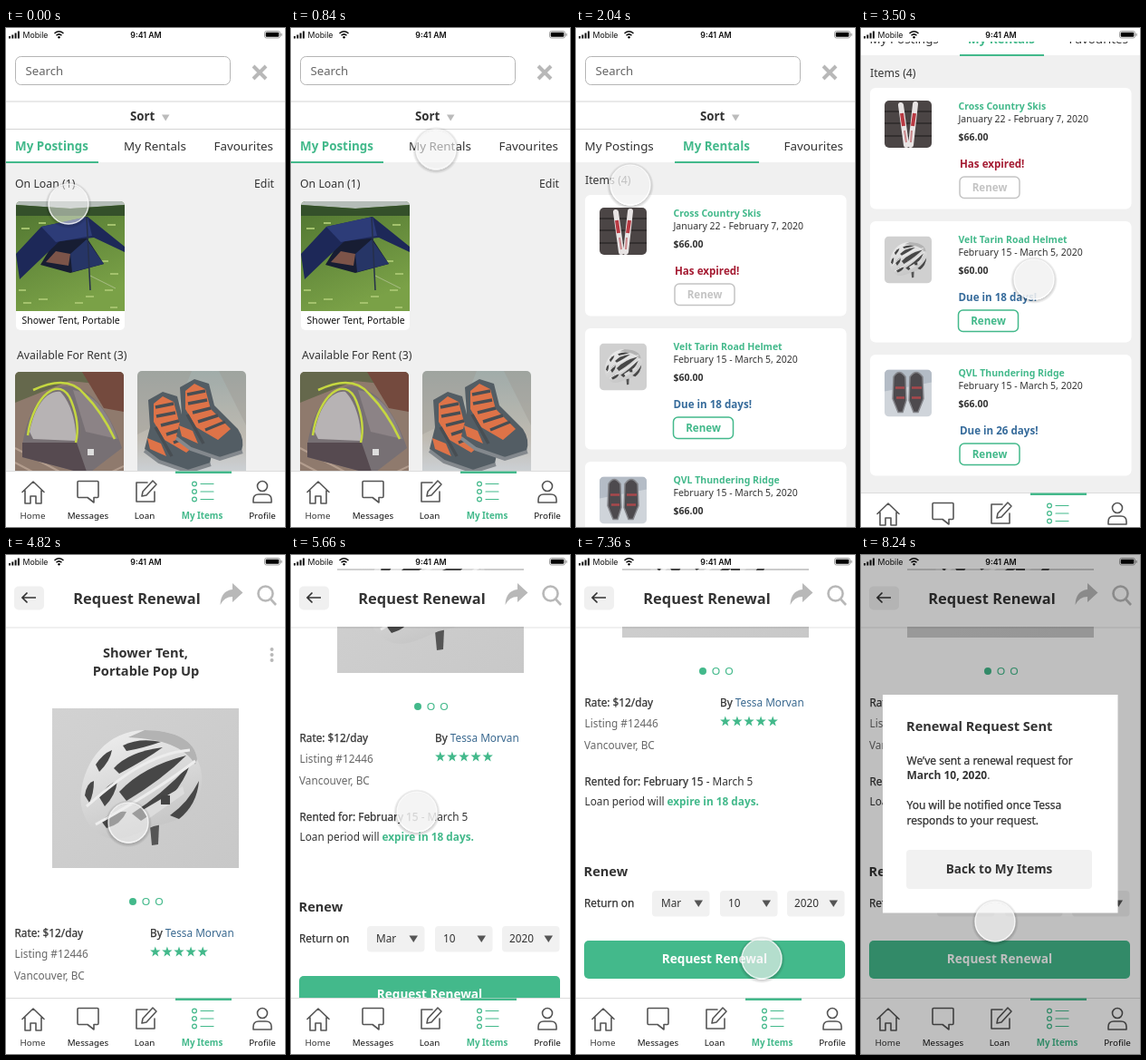
These frames come from a looping animation (308x550 px, 8.26 s). An HTML page:

```html
<!DOCTYPE html>
<html lang="en">
<head>
<meta charset="utf-8">
<title>Rental renewal flow</title>
<style>
html, body { margin: 0; width: 100%; height: 100%; overflow: hidden; background: #fff; }
svg { display: block; }
#stage { width: 308px; height: 550px; font: 11.8px "Noto Sans", "Open Sans", sans-serif; --green: #43b98b; }
text { fill: #333; white-space: pre; }
.m { stroke: #333; stroke-width: .25px; } .m tspan { stroke: none; } .b { font-weight: 600; }
.s10 { font-size: 10.5px; } .s12 { font-size: 12.3px; } .s13 { font-size: 13.4px; }
.s14 { font-size: 14.6px; } .s16 { font-size: 16.4px; } .st { font-size: 11.6px; }
.mid { text-anchor: middle; }
.g { fill: var(--green); } .soft { fill: #666; } .dark { fill: #111; }
.ln { fill: none; stroke: #555; stroke-width: 1.6; stroke-linejoin: round; stroke-linecap: round; }
.ln.on { stroke: var(--green); stroke-width: 1.2; }
.nav text { font-size: 9.8px; text-anchor: middle; }
.nav .g { font-weight: 600; }
.bar text { font: 600 8.8px Inter, sans-serif; fill: #111; }

.old, .in, .out, .fresh, .ski, .boots, .line, .dock, .list, .detail, .body, .modal, .cursor, .dot {
  animation: 8260ms ease-out infinite both;
}
.list { animation-name: scroll1; animation-timing-function: ease-in-out; }
.body { animation-name: scroll2; }
.old { animation-name: leave; }
.out { animation-name: fadeOut; }
.in { animation-name: fadeIn; }
.fresh { animation-name: slide; }
.ski { animation-name: late; }
.boots { animation-name: drift; }
.line { animation-name: tab; }
.dock { animation-name: dock; }
.detail { animation-name: open; }
.modal { animation-name: pop; }
.cursor { animation-name: move; animation-timing-function: ease-in-out; }
.dot { animation-name: press; animation-timing-function: linear; }

@keyframes fadeOut { 0%, 17.46% { opacity: 1 } 21.09%, 100% { opacity: 0 } }
@keyframes fadeIn { 0%, 17.46% { opacity: 0 } 21.09%, 100% { opacity: 1 } }
@keyframes leave { 0%, 18.2% { opacity: 1 } 21.09%, 100% { opacity: 0 } }
@keyframes late { 0%, 18.2% { opacity: 0 } 21.09%, 100% { opacity: 1 } }
@keyframes slide { 0%, 17.46% { transform: translateX(308px) } 21.09%, 100% { transform: none } }
@keyframes drift {
  0%, 17.46% { transform: none; opacity: 1 }
  21.09%, 100% { transform: translate(-120px, -180px); opacity: 0 }
}
@keyframes tab {
  0%, 17.46% { transform: none }
  21.09%, 100% { transform: translateX(109px) scaleX(.912) }
}
@keyframes dock { 0%, 17.46% { transform: none } 21.09%, 100% { transform: translateY(142px) } }
@keyframes scroll1 { 0%, 30.75% { transform: none } 40.19%, 100% { transform: translateY(-118px) } }
@keyframes open { 0%, 47.2% { opacity: 0 } 50.85%, 100% { opacity: 1 } }
@keyframes scroll2 { 0%, 61.5% { transform: none } 72%, 100% { transform: translateY(-254px) } }
@keyframes pop { 0%, 92.25% { opacity: 0 } 95.88%, 100% { opacity: 1 } }
@keyframes move {
  0% { transform: translate(69px, 194px) }
  11%, 18% { transform: translate(161px, 133px) }
  24.7% { transform: translate(60px, 173px) }
  30.5% { transform: translate(191px, 395px) }
  40.19%, 42.4% { transform: translate(191px, 277px) }
  46%, 50.5% { transform: translate(141px, 322px) }
  58.35% { transform: translate(135px, 295px) }
  61.5% { transform: translate(139px, 420px) }
  69%, 79.2% { transform: translate(139px, 282px) }
  89.1%, 98.3% { transform: translate(205px, 445px); animation-timing-function: ease-in }
  99.27% { transform: translate(183px, 424px); animation-timing-function: linear }
  99.76%, 100% { transform: translate(148px, 404px) }
}
@keyframes press {
  0%, 8% { fill-opacity: .5 } 16%, 21% { fill-opacity: .85 } 24.7% { fill-opacity: .75 }
  30%, 46% { fill-opacity: .87 } 51%, 59% { fill-opacity: .5 } 62%, 79% { fill-opacity: .85 }
  89%, 100% { fill-opacity: .65 }
}
</style>
</head>
<body>
<svg id="stage" viewBox="0 0 308 550">
  <defs>
    <clipPath id="round"><rect width="52" height="52" rx="5"/></clipPath>
    <clipPath id="top"><rect width="120" height="130" rx="5"/></clipPath>
    <linearGradient id="wall" x2="1" y2="1"><stop stop-color="#d2d2d2"/><stop offset="1" stop-color="#c8c8c8"/></linearGradient>
    <linearGradient id="lawn" x2=".4" y2="1"><stop stop-color="#4f7430"/><stop offset="1" stop-color="#7aa147"/></linearGradient>
    <linearGradient id="stone" x2="0" y2="1"><stop stop-color="#93a09d"/><stop offset=".6" stop-color="#b5b0a6"/><stop offset="1" stop-color="#c9d0d8"/></linearGradient>
    <linearGradient id="shell" x2=".4" y2="1"><stop stop-color="#f1f1f1"/><stop offset="1" stop-color="#c6c6c6"/></linearGradient>
    <radialGradient id="halo"><stop offset=".83" stop-opacity="0"/><stop offset=".85" stop-opacity=".2"/><stop offset="1" stop-opacity="0"/></radialGradient>
    <path id="star" d="M0-6L1.4-1.9H5.7L2.3.7L3.5 4.9L0 2.4L-3.5 4.9L-2.3.7L-5.7-1.9H-1.4Z"/>

    <g id="helmet">
      <path d="M108 130L110 151L117 150L118 128Z" fill="#555"/>
      <path d="M32 92C36 58 60 25 102 24C136 24 158 36 160 56C168 72 166 88 160 102C150 122 130 126 112 130C92 138 74 150 54 140C38 130 29 110 32 92Z" fill="url(#shell)"/>
      <path d="M102 24C136 24 158 36 160 56L158 62C146 42 122 34 84 32Z" fill="#b3b3b3"/>
      <g fill="#474747">
        <path d="M78 41Q96 32 120 37Q100 44 82 47Z"/>
        <path d="M68 66Q84 48 122 43Q104 56 74 72Z"/>
        <path d="M48 62Q56 50 66 46Q64 58 52 70Z"/>
        <path d="M74 92Q100 64 148 52Q122 78 82 102Z"/>
        <path d="M36 96Q38 82 46 80Q46 94 41 104Z"/>
        <path d="M52 98Q62 82 72 80Q70 96 58 108Z"/>
        <path d="M88 116Q120 96 152 62Q140 98 98 124Z"/>
        <path d="M54 124Q68 112 82 114Q76 128 60 132Z"/>
        <path d="M130 118Q150 104 162 80Q160 106 140 122Z"/>
      </g>
      <path d="M38 108C66 84 104 50 152 46M48 128C84 108 124 84 158 58" fill="none" stroke="#ededed" stroke-width="3"/>
      <path d="M100 112L144 86L146 94L106 122Z" fill="#dcdcdc"/>
      <rect x="120" y="96" width="10" height="10" fill="#444"/>
    </g>

    <g id="tarp">
      <path fill="url(#lawn)" d="M0 0H120V121H0Z"/>
      <path fill="#b5bdb8" d="M0 0H120V4L60 8L0 4Z"/>
      <path fill="#34502a" d="M0 4L60 8L120 4V16H0Z"/>
      <path d="M3 98h8m14 10h10m30 4h9m24-14h9M8 112h9m60-7h9m18 12h8M92 66h10m2 14h9M6 30h9m10-6h8m68 2h9" stroke="#a3c26c" stroke-width="2"/>
      <path fill="#171d33" d="M27 70L44 42L78 40L97 69L60 79Z"/>
      <path fill="#7c5449" d="M33 67L44 55L60 58L58 71Z"/>
      <path fill="#263566" d="M60 58L78 42L97 69L62 78Z"/>
      <path fill="#1d2858" d="M0 58L28 28L79 17L120 50V56L86 40L48 44L4 86Z"/>
      <path fill="#2d3c78" d="M28 28L79 17L84 38L44 45Z"/>
      <path d="M78 17L82 98" stroke="#26304a" stroke-width="1.5"/>
      <path d="M82 82L110 96" stroke="#bcc9a0" stroke-width=".7"/>
    </g>

    <g id="dome">
      <path fill="#8f7a6d" d="M0 0H120V121H0Z"/>
      <path fill="#65684c" d="M0 0H120V16L60 10L0 34Z"/>
      <path fill="#744a3e" d="M74 0H120V44L98 40Z"/>
      <path d="M0 100L40 121M0 84L70 121M84 121L120 104" stroke="#b39d8e" stroke-width="2"/>
      <path fill="#777074" d="M8 80C16 34 36 14 60 16C88 20 106 48 118 84L80 113L8 94Z"/>
      <path fill="#b7b3b4" d="M16 66C22 36 36 20 50 22C62 34 68 58 67 76L20 74Z"/>
      <path fill="#564a50" d="M8 78L68 78L80 113L8 94Z"/>
      <path fill="#8c8386" d="M64 20C88 24 104 46 113 74L78 66Z"/>
      <path d="M14 70C20 26 50 2 62 32C70 52 70 66 67 78M20 20Q58 2 76 24Q96 44 110 74" fill="none" stroke="#c5d740" stroke-width="2.5"/>
      <rect x="80" y="85" width="7" height="7" fill="#ddd"/>
    </g>

    <g id="boot">
      <path fill="#3b464e" d="M4 10L20 1L36 6L42 30L68 56Q76 68 72 80L48 88L14 76L0 64L6 40Z"/>
      <path fill="#d9602f" d="M10 14L20 6L32 12L38 34L60 56L46 68L22 54L10 34Z"/>
      <path fill="#d9602f" d="M3 52L18 58L24 72L6 64Z"/>
      <path d="M12 18L32 14M13 28L34 24M18 38L38 33M24 48L46 41M32 57L54 48M12 40L30 72" stroke="#2f363b" stroke-width="3.5"/>
      <path d="M0 66L16 78L48 89L73 81" fill="none" stroke="#72787d" stroke-width="4"/>
    </g>
    <g id="pair">
      <path fill="url(#stone)" d="M0 0H120V120H0Z"/>
      <path fill="#8f8b83" opacity=".4" d="M0 0H60L40 50L0 70ZM90 0H120V60Z"/>
      <use href="#boot" x="8" y="22"/>
      <use href="#boot" x="43" y="8"/>
      <path fill="#fff" opacity=".12" d="M0 0H120V120H0Z"/>
    </g>

    <g id="skis" clip-path="url(#round)">
      <path fill="#4b4545" d="M0 0H52V52H0Z"/>
      <path d="M0 12H52M0 25H52M0 39H52" stroke="#2d2929" stroke-width="1.5"/>
      <path d="M18 5L24 49M34 4L29 49" stroke="#e8e4e4" stroke-width="6" stroke-linecap="round"/>
      <path d="M19 14L21 28M33 14L31 28" stroke="#b93a43" stroke-width="4"/>
      <path d="M22 33L24 46M30 33L29 46" stroke="#c9868a" stroke-width="2"/>
    </g>
    <g id="snowshoes" clip-path="url(#round)">
      <path fill="#cfd4da" d="M0 0H52V52H0Z"/>
      <path fill="#b4bcc6" d="M0 0H52V14L0 24Z"/>
      <g fill="#4d4a4e" stroke="#85868b" stroke-width="1.5">
        <path d="M10 8Q16-2 23 8L24 34L20 47H15L9 32Z"/>
        <path d="M28 8Q35-2 42 8L43 32L37 47H32L27 34Z"/>
      </g>
      <path d="M12 20H22M30 20H41M13 31H22M30 31H40" stroke="#a8484c" stroke-width="2.5"/>
    </g>
    <g id="lid" clip-path="url(#round)">
      <path fill="#d0d0d0" d="M0 0H52V52H0Z"/>
      <use href="#helmet" transform="translate(-4 -1) scale(.31)"/>
    </g>

    <g id="nav" class="nav">
      <path fill="#fff" d="M0 488H308V550H0Z"/>
      <path d="M0 488.5H308" stroke="#dcdcdc"/>
      <path class="g" d="M187 488.5H249V491H187Z"/>
      <path class="ln" d="M18 511.5L30 500L42 511.5M21 509.5V524H27V516H33V524H39V509.5"/>
      <path class="ln" d="M80 499.500H101Q102 499.500 102 500.500V516Q102 517.500 101 517.500H97V523L90 517.500H80Q79 517.500 79 516V500.500Q79 499.500 80 499.500Z"/>
      <path class="ln" d="M156 501H144V522H164V511M150 516L151 511L162 499L166 503L155 515Z"/>
      <path class="ln on" d="M215 502.500H229M215 511H229M215 519.500H229"/>
      <g class="ln on"><circle cx="208" cy="502.500" r="2.400"/><circle cx="208" cy="511" r="2.400"/><circle cx="208" cy="519.500" r="2.400"/></g>
      <circle class="ln" cx="283" cy="505" r="5.500"/>
      <path class="ln" d="M273 523V520Q273 514 279 514H287Q293 514 293 520V523Z"/>
      <text x="29.500" y="541">Home</text><text class="dark" x="90.500" y="541">Messages</text><text class="dark" x="153" y="541">Loan</text>
      <text class="g" x="216.500" y="541">My Items</text><text class="dark" x="283" y="541">Profile</text>
    </g>
  </defs>

  <path fill="#fff" d="M0 0H308V550H0Z"/>
  <g class="list">
    <path fill="#f0f0f0" d="M0 148H308V700H0Z"/>
    <g class="old">
      <text class="s12" x="10" y="176">On Loan (1)</text><text class="s12" x="274" y="176">Edit</text>
      <rect x="11" y="191" width="120" height="142" rx="5" fill="#fff"/>
      <g transform="translate(11 191)" clip-path="url(#top)"><use href="#tarp"/></g>
      <text class="s10 dark" x="17.500" y="325.500">Shower Tent, Portable</text>
      <text class="s12" x="12" y="364.500">Available For Rent (3)</text>
      <rect x="10" y="379" width="120" height="142" rx="5" fill="#fff"/>
      <g transform="translate(10 379)" clip-path="url(#top)"><use href="#dome"/></g>
      <text class="s10 dark" x="16.500" y="515.500">3-person tent</text>
      <rect x="145" y="379" width="120" height="142" rx="5" fill="#fff"/>
      <text class="s10 dark" x="151" y="515.500">Brenvik Snow Boots</text>
    </g>
    <g class="fresh" id="cards"></g>
    <g class="ski"><use href="#skis" x="26" y="198"/></g>
    <g class="boots"><g transform="translate(145 378)" clip-path="url(#top)"><use href="#pair"/></g></g>

    <path fill="#fff" d="M0 0H308V148H0Z"/>
    <rect x="10.500" y="31.500" width="237" height="31" rx="6" fill="#fff" stroke="#b5b5b5"/>
    <text x="21.500" y="52" font-size="13.200" class="soft">Search</text>
    <path d="M273 42L287 56M287 42L273 56" stroke="#b8b8b8" stroke-width="4"/>
    <path d="M0 81H308M0 111.500H308" stroke="#d4d4d4"/>
    <text class="b" x="137" y="101.500" font-size="13.300">Sort</text>
    <path fill="#bbb" d="M172 95.500H180.500L176.200 102.500Z"/>
    <g class="out s13"><text class="b g" x="10" y="135">My Postings</text><text x="130" y="135">My Rentals</text></g>
    <g class="in s13"><text x="9.500" y="135">My Postings</text><text class="b g" x="118" y="135">My Rentals</text></g>
    <text class="s13" x="229.500" y="135">Favourites</text>
    <path class="line g" d="M0 147H102V149H0Z"/>
    <g class="dock"><use href="#nav"/></g>
  </g>
  <path fill="#fff" d="M0 0H308V15H0Z"/>

  <g class="detail">
    <path fill="#fff" d="M0 0H308V550H0Z"/>
    <g class="body">
      <text class="b s14 mid" x="154" y="113">Shower Tent,</text>
      <text class="b s14 mid" x="154.500" y="133">Portable Pop Up</text>
      <g fill="#b8b8b8"><circle cx="293.500" cy="104" r="2"/><circle cx="293.500" cy="110" r="2"/><circle cx="293.500" cy="116" r="2"/></g>
      <path fill="url(#wall)" d="M51 169H257V345H51Z"/>
      <use href="#helmet" x="51" y="169"/>
      <circle class="g" cx="140" cy="382" r="4"/>
      <g class="ln on"><circle cx="154.500" cy="382" r="3.500"/><circle cx="169" cy="382" r="3.500"/></g>
      <text class="m" x="9.500" y="420.500">Rate: $12/day</text>
      <text class="soft" x="9.500" y="444">Listing #12446</text>
      <text class="soft" x="9" y="467.500">Vancouver, BC</text>
      <text class="m" x="159" y="420.500">By <tspan fill="#39688f">Tessa Morvan</tspan></text>
      <g id="stars" class="g"></g>
      <text x="9.500" y="507.500"><tspan class="m">Rented for: February 15</tspan> - March 5</text>
      <text x="9.500" y="529.500">Loan period will <tspan class="b g">expire in 18 days.</tspan></text>
      <text class="b s14" x="8.500" y="608">Renew</text>
      <text class="m" x="9" y="641.500">Return on</text>
      <g id="picks"></g>
      <rect class="g" x="9" y="679" width="288" height="42" rx="5"/>
      <text class="b mid" x="153" y="704" font-size="13.600" style="fill:#fff">Request Renewal</text>
    </g>
    <path fill="#000" opacity=".06" d="M0 79H308V81H0Z"/>
    <path fill="#fff" d="M0 0H308V15H0ZM0 17H308V79H0Z"/>
    <rect x="9" y="34.500" width="33" height="26" rx="5" fill="#f0f0f0"/>
    <path d="M33 47H18M23.500 41.500L18 47L23.500 52.500" fill="none" stroke="#333" stroke-width="1.700"/>
    <text class="b s16 mid" x="144.500" y="54">Request Renewal</text>
    <path fill="#b8b8b8" d="M250 31L261.500 41.500L250 52V46Q241 46 236.500 55Q237 39.500 250 38Z"/>
    <g fill="none" stroke="#b8b8b8" stroke-width="2.600"><circle cx="286.500" cy="42.500" r="8"/><path d="M292 48.500L298 55"/></g>
    <use href="#nav"/>
  </g>

  <g class="bar">
    <path fill="#111" d="M3 9H5V11.500H3ZM6.300 7.500H8.300V11.500H6.300ZM9.600 5.500H11.600V11.500H9.600ZM12.900 3.500H14.900V11.500H12.900Z"/>
    <text x="18.500" y="10.500" style="font-weight:400">Mobile</text>
    <path d="M53.500 6Q58.500 1.500 63.500 6M55.500 8.300Q58.500 5.500 61.500 8.300" fill="none" stroke="#111" stroke-width="1.500"/><circle cx="58.500" cy="10.300" r="1.200"/>
    <text class="mid" x="154.500" y="10.500">9:41 AM</text>
    <rect x="285.500" y="3.500" width="17" height="7.500" rx="2" fill="none" stroke="#888" stroke-width=".8"/>
    <rect x="286.700" y="4.700" width="14.600" height="5.100" rx="1"/><path fill="#888" d="M303.500 6H304.600V8.800H303.500Z"/>
  </g>

  <g class="modal">
    <path opacity=".25" d="M0 0H308V550H0Z"/>
    <path fill="#fff" d="M24 154H283.500V394.500H24Z"/>
    <text class="b s14" x="50" y="193.500">Renewal Request Sent</text>
    <g font-size="12">
      <text class="m" x="50.500" y="230.500">We’ve sent a renewal request for</text>
      <text x="50.500" y="247"><tspan class="b">March 10, 2020</tspan>.</text>
      <text class="m" x="50.500" y="280">You will be notified once Tessa</text>
      <text class="m" x="50.500" y="296.500">responds to your request.</text>
    </g>
    <rect x="50" y="325" width="205" height="43" rx="4" fill="#f1f1f1"/>
    <text class="b mid" x="152.500" y="351" font-size="13.600">Back to My Items</text>
  </g>

  <g class="cursor">
    <circle cy="1" r="26" fill="url(#halo)"/>
    <circle class="dot" r="22" fill="#f2f2f2" stroke="#fff" stroke-opacity=".8" stroke-width="1.500"/>
  </g>
</svg>
<script>
const fill = (id, html) => document.getElementById(id).innerHTML = html;

const card = ({ y, x = 109, name, date, price, note, tint, btn = '#43b98b', pic }) => `
  <rect x="10" y="${y}" width="288.500" height="133.500" rx="6" fill="#fff"/>
  ${pic ? `<use href="#${pic}" x="26" y="${y + 16.5}"/>` : ''}
  <text class="s10 b g" x="107.500" y="${y + 24}">${name}</text>
  <text class="s10" x="107.500" y="${y + 38}">${date}</text>
  <text class="s10 b" x="107.500" y="${y + 58}">${price}</text>
  <text class="st b" x="${x}" y="${y + 88}" style="fill:${tint}">${note}</text>
  <rect x="${x}" y="${y + 98}" width="66" height="23.500" rx="5" fill="none" stroke="${btn}" stroke-width="1.500"/>
  <text class="st b mid" x="${x + 33}" y="${y + 114}" style="fill:${btn}">Renew</text>`;

const late = 'February 15 - March 5, 2020';
fill('cards', '<text class="s12" x="10" y="172">Items (4)</text>' + [
  { y: 184, name: 'Cross Country Skis', date: 'January 22 - February 7, 2020', price: '$66.00',
    note: 'Has expired!', tint: '#a51c33', btn: '#c4c4c4' },
  { y: 331, x: 107.5, name: 'Velt Tarin Road Helmet', date: late, price: '$60.00',
    note: 'Due in 18 days!', tint: '#366b9b', pic: 'lid' },
  { y: 478, name: 'QVL Thundering Ridge', date: late, price: '$66.00',
    note: 'Due in 26 days!', tint: '#366b9b', pic: 'snowshoes' },
].map(card).join(''));

fill('stars', [0, 1, 2, 3, 4].map(i => `<use href="#star" x="${164.8 + i * 13.1}" y="437.500"/>`).join(''));

fill('picks', [[84, 'Mar', 94], [159, '10', 168], [233, '2020', 241]].map(([x, label, tx]) => `
  <rect x="${x}" y="624" width="63.500" height="28.500" rx="4" fill="#f1f1f1"/>
  <text x="${tx}" y="641.500">${label}</text>
  <path fill="#555" d="M${x + 46.5} 634.500h9.500l-4.750 7.500z"/>`).join(''));
</script>
</body>
</html>
```
